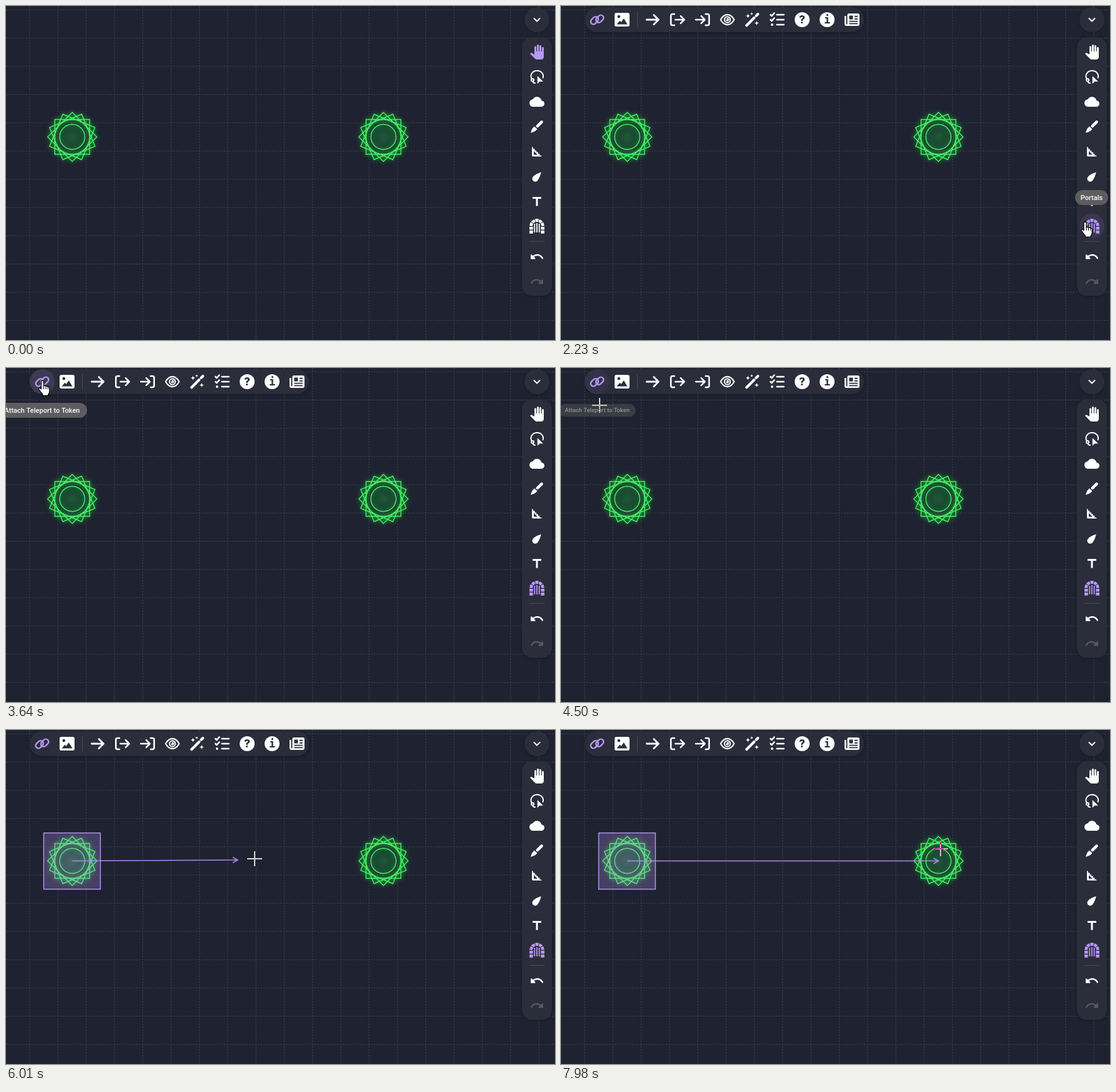
These frames come from a looping animation (881x537 px, 8000 ms). An HTML page with a canvas:

```html
<!DOCTYPE html>
<html>
<head>
<meta charset="utf-8">
<style>
html, body { margin: 0; height: 100%; overflow: hidden; background: #1f2230; }
canvas { display: block; }
</style>
</head>
<body>
<canvas id="stage" width="881" height="537"></canvas>
<script>
const c = document.getElementById('stage').getContext('2d');
const LOOP = 8000, STEP = 70, CELL = 45.4;
const BAR = '#2b2d3b', PURPLE = '#b898f7', WHITE = '#fff';
const LEFT = { x: 106.3, y: 210.5 }, RIGHT = { x: 605.7, y: 210.5 };

// Pointer path: time, x, y
const track = [
  [560, 790, 560], [840, 830, 440], [1120, 843, 362], [1400, 841, 347],
  [2170, 841, 347], [2240, 790, 320], [2520, 430, 190], [2800, 130, 75], [3010, 45, 48],
  [3290, 54, 28], [3430, 58.5, 20], [4340, 58.5, 20], [4480, 62, 60], [4760, 95, 190],
  [4900, 104, 222], [5040, 106, 207], [5390, 106, 207], [5600, 165, 206],
  [5950, 399, 207], [6090, 470, 207], [6300, 548, 206], [6640, 594, 205],
  [7000, 594, 205], [7140, 604, 204], [7740, 604, 204], [7980, 609, 191]
];

// Icons live in a 24 px box: fill path, stroke path, stroke width
const undoPath = 'M12.5 8c-2.65 0-5.05.99-6.9 2.6L3.71 8.71C3.08 8.08 2 8.52 2 9.41V15c0 .55.45 1 1 1h5.59c.89 0 1.34-1.08.71-1.71l-1.91-1.91c1.39-1.16 3.16-1.88 5.12-1.88 3.16 0 5.89 1.84 7.19 4.5.27.56.91.84 1.5.64.71-.23 1.07-1.04.75-1.72C20.23 10.42 16.65 8 12.5 8z';
const icons = {
  hand: ['M23 5.5V20c0 2.2-1.8 4-4 4h-7.3c-1.08 0-2.1-.43-2.85-1.19L1 14.83s1.26-1.23 1.3-1.25c.22-.19.49-.29.79-.29.22 0 .42.06.6.16.04.01 4.31 2.46 4.31 2.46V4c0-.83.67-1.5 1.5-1.5S11 3.17 11 4v7h1V1.5c0-.83.67-1.5 1.5-1.5S15 .67 15 1.5V11h1V2.5c0-.83.67-1.5 1.5-1.5s1.5.67 1.5 1.5V11h1V5.5c0-.83.67-1.5 1.5-1.5s1.5.67 1.5 1.5z'],
  lasso: ['M12.8 10.5V23l3.6-3.6H22z', 'M3.4 14.5A9.8 8.8 0 1 1 21.6 13.5M3 17a2 2 0 1 0 4 0a2 2 0 1 0-4 0M5.5 19q.5 3 3.5 3', 2],
  cloud: ['M19.35 10.04C18.67 6.59 15.64 4 12 4 9.11 4 6.6 5.64 5.35 8.04 2.34 8.36 0 10.91 0 14c0 3.31 2.69 6 6 6h13c2.76 0 5-2.24 5-5 0-2.64-2.05-4.78-4.65-4.96z'],
  brush: ['M8 11.5L12.5 16 9.5 19Q7 20.5 2 22 3.2 17 5 14.5z', 'M19.6 4.4L12.8 11.2', 4.6],
  square: ['M17.66 17.66l-1.06 1.06-.71-.71 1.06-1.06-1.94-1.94-1.06 1.06-.71-.71 1.06-1.06-1.94-1.94-1.06 1.06-.71-.71 1.06-1.06L9.7 9.7l-1.06 1.06-.71-.71 1.06-1.06-1.94-1.94-1.06 1.06-.71-.71 1.06-1.06L4 4v14c0 1.1.9 2 2 2h14l-2.34-2.34zM7 17v-5.76L12.76 17H7z'],
  drop: ['M18.8 5.2C16 6 8.5 9 6 12.2a4.8 4.8 0 1 0 7.6 5.6C16 14.5 18 9 18.8 5.2z'],
  text: ['M5 5h14v3h-5.5v11.5h-3V8H5z'],
  undo: [undoPath],
  chevron: ['', 'M7.5 10l4.5 4.5 4.5-4.5', 2.1],
  image: ['M3 1h18q3 0 3 3v16q0 3-3 3H3q-3 0-3-3V4q0-3 3-3zM4.5 7a2.3 2.3 0 1 0 4.6 0a2.3 2.3 0 1 0-4.6 0M3.5 19.5h17L14.8 10 10.5 16 8.5 13.5z'],
  arrow: ['', 'M2.5 12H21.5M14 4.5l7.5 7.5-7.5 7.5', 2.9],
  leave: ['', 'M7 3H4Q1.3 3 1.3 5.7V18.3Q1.3 21 4 21H7M8.5 12H22.5M17 6.2l5.8 5.8-5.8 5.8', 2.6],
  enter: ['', 'M17 3h3q2.7 0 2.7 2.7V18.3Q22.7 21 20 21h-3M1.3 12H15.5M10 6.2l5.8 5.8-5.8 5.8', 2.6],
  eye: ['M11 9.7a2.5 2.5 0 1 1-1.4 2.6q2 .3 1.4-2.6z', 'M1.2 12Q5.5 3.9 12 3.9T22.8 12Q18.5 20.1 12 20.1T1.2 12zM7.3 12a4.7 4.7 0 1 0 9.4 0a4.7 4.7 0 1 0-9.4 0', 2.1],
  wand: ['M5 2.5l1 2.5 2.5 1L6 7 5 9.5 4 7 1.5 6 4 5zM11 0l.7 1.8 1.8.7-1.8.7L11 5l-.7-1.8-1.8-.7 1.8-.7zM19 14l1 2.5 2.5 1-2.5 1-1 2.5-1-2.5-2.5-1 2.5-1z', 'M2.8 21.2L15 9M18.2 5.8L21 3', 4.2],
  list: ['M1.7 20a2 2 0 1 0 4 0a2 2 0 1 0-4 0', 'M1.2 4l2 2 4-4.5M1.2 12l2 2 4-4.5M11.5 4H22.5M11.5 12H22.5M11.5 20H22.5', 2.6],
  news: ['M7 2h14q3 0 3 3v14q0 3-3 3H3q-3 0-3-3V6h2.6v12.5q0 1 .9 1T4.5 18.500V4.500Q4.500 2 7 2zM7.500 5.500v6h6v-6zM16 5.800v1.900h5V5.800zM16 9.800v1.900h5V9.800zM7.500 13.800v1.800h13.500v-1.800zM7.500 17.500v1.800h13.500v-1.800z']
};
for (const icon of Object.values(icons)) {
  icon[0] = new Path2D(icon[0]);
  icon[1] = icon[1] && new Path2D(icon[1]);
}
const handCursor = new Path2D('M-2 2a2 2 0 0 1 4 0v7q2-1.500 3.500.5 2-1 3.300.8 2.500-.5 2.500 2v5q0 3-2 5v2h-9v-2q-3-3-6-8-1-2.500 1.500-2.500l2.200 2z');

const clamp = v => Math.max(0, Math.min(1, v));
const ramp = (t, a, b) => clamp((t - a) / (b - a));

function pointerAt(t) {
  const i = track.findIndex(k => k[0] > t);
  if (i === 0) return { x: track[0][1], y: track[0][2] };
  const a = track[i < 0 ? track.length - 1 : i - 1], b = i < 0 ? a : track[i];
  const u = i < 0 ? 0 : ramp(t, a[0], b[0]);
  return { x: a[1] + (b[1] - a[1]) * u, y: a[2] + (b[2] - a[2]) * u };
}

function disc(x, y, r, color) {
  c.fillStyle = color;
  c.beginPath();
  c.arc(x, y, r, 0, 7);
  c.fill();
}

function pill(x, y, w, h, r, color) {
  c.fillStyle = color;
  c.beginPath();
  c.roundRect(x, y, w, h, r);
  c.fill();
}

function line(color, width, ...points) {
  c.strokeStyle = color;
  c.lineWidth = width;
  c.beginPath();
  points.forEach(p => c.lineTo(p[0], p[1]));
  c.stroke();
}

function icon(name, x, y, color = WHITE, flip = 1) {
  const [fill, stroke, width] = icons[name];
  c.save();
  c.translate(x, y);
  c.scale(flip, 1);
  c.translate(-12, -12);
  c.fillStyle = c.strokeStyle = color;
  c.fill(fill, 'evenodd');
  if (stroke) {
    c.lineWidth = width;
    c.lineCap = c.lineJoin = 'round';
    c.stroke(stroke);
  }
  c.restore();
}

function gate(x, y, color) {
  c.save();
  c.translate(x, y);
  c.strokeStyle = c.fillStyle = color;
  c.lineWidth = 4.8;
  for (let i = 0; i < 5; i++) {
    c.beginPath();
    c.arc(0, 0, 9.5, Math.PI * (1 + i / 5) + .05, Math.PI * (1.2 + i / 5) - .05);
    c.stroke();
  }
  for (const side of [-12, 6.4]) {
    c.fillRect(side, 1, 5.6, 4.6);
    c.fillRect(side, 7, 5.6, 4.8);
  }
  for (const bar of [-3.7, 0, 3.7]) c.fillRect(bar - .9, bar ? -4 : -5, 1.8, bar ? 14 : 15);
  c.restore();
}

function chain(x, y) {
  c.strokeStyle = PURPLE;
  c.lineWidth = 2.4;
  for (const s of [-1, 1]) {
    c.save();
    c.translate(x + s * 4.2, y - s * 1.3);
    c.rotate(-Math.PI / 4);
    c.beginPath();
    c.roundRect(-6.8, -4.4, 13.6, 8.8, 4.4);
    c.stroke();
    c.restore();
  }
}

function badge(x, sign, font) {
  disc(x, 22, 12, WHITE);
  c.fillStyle = BAR;
  c.font = font;
  c.textAlign = 'center';
  c.fillText(sign, x, 28.2);
}

function grid() {
  c.save();
  c.setLineDash([2.27, 2.27]);
  for (let x = 38; x < 881; x += CELL) line('#434651', 1, [x, 0], [x, 537]);
  for (let y = 6.2; y < 537; y += CELL) line('#434651', 1, [0, y], [881, y]);
  c.restore();
}

function portal({ x, y }) {
  c.save();
  c.translate(x, y);
  const glow = c.createRadialGradient(0, 0, 2, 0, 0, 21);
  glow.addColorStop(0, '#1d5635');
  glow.addColorStop(1, '#1b3c33');
  disc(0, 0, 20.5, glow);
  c.strokeStyle = '#4cf06a';
  c.shadowColor = '#12d637';
  c.shadowBlur = 7;
  c.lineWidth = 1.4;
  c.beginPath();
  for (let i = 0; i < 4; i++) {
    for (let k = 0; k < 4; k++) {
      const a = Math.PI * (i / 8 + k / 2);
      c[k ? 'lineTo' : 'moveTo'](39.5 * Math.cos(a), 39.5 * Math.sin(a));
    }
    c.closePath();
  }
  for (const r of [20.2, 28]) {
    c.moveTo(r, 0);
    c.arc(0, 0, r, 0, 7);
  }
  c.stroke();
  c.restore();
}

function tooltip(text, x, y, width, alpha) {
  if (!alpha) return;
  c.save();
  c.globalAlpha = alpha;
  c.translate(x, y);
  c.scale(.75 + .25 * alpha, .75 + .25 * alpha);
  pill(-width / 2, -12, width, 24, 12, '#5d5d60');
  c.fillStyle = WHITE;
  c.font = '500 11px Roboto, sans-serif';
  c.textAlign = 'center';
  c.fillText(text, 0, 3.5);
  c.restore();
}

function shadowed(draw) {
  c.save();
  c.shadowColor = 'rgba(0,0,0,.25)';
  c.shadowBlur = 5;
  c.shadowOffsetY = 1;
  draw();
  c.restore();
}

function sidePanel(active, hover) {
  shadowed(() => {
    disc(852, 22, 20, BAR);
    pill(828, 50, 48, 416, 16, BAR);
  });
  icon('chevron', 852, 22);
  icon('hand', 852, 74, active ? WHITE : PURPLE);
  ['lasso', 'cloud', 'brush', 'square', 'drop', 'text'].forEach((n, i) => icon(n, 852, 114 + i * 40));
  if (hover) disc(852, 354, 20, `rgba(184,152,247,${.1 * hover})`);
  gate(852, 354, active ? PURPLE : WHITE);
  line('#4a4c58', 1, [840, 378.5], [864, 378.5]);
  icon('undo', 852, 403);
  icon('undo', 852, 443, '#555763', -1);
}

function topBar(hover, press) {
  shadowed(() => pill(38, 2, 448, 40, 20, BAR));
  if (hover) disc(58, 22, 20, `rgba(184,152,247,${.13 * hover})`);
  if (press) disc(58, 22, 12, 'rgba(184,152,247,.2)');
  chain(58, 22);
  icon('image', 98, 22);
  line('#4a4c58', 1, [122.5, 10], [122.5, 34]);
  ['arrow', 'leave', 'enter', 'eye', 'wand', 'list'].forEach((n, i) => icon(n, 147 + i * 40, 22));
  badge(387, '?', '800 17px Inter, sans-serif');
  badge(427, 'i', 'bold 17px "DejaVu Sans Mono", monospace');
  icon('news', 467, 22);
}

function selection(t, pointer) {
  c.fillStyle = 'rgba(184,152,247,.25)';
  c.fillRect(60.500, 165.500, 91, 90.500);
  c.strokeStyle = PURPLE;
  c.lineWidth = 1.4;
  c.strokeRect(60.500, 165.500, 91, 90.500);
  // The arrow trails the pointer and locks onto the second portal
  const late = pointerAt(t - 48);
  const tip = late.x > 560 ? RIGHT : { x: Math.max(LEFT.x, late.x + 5), y: 209 };
  line('#ac8bec', 1.6, [LEFT.x, LEFT.y], [tip.x, tip.y]);
  line('#ac8bec', 1.6, [tip.x - 8, tip.y - 4.5], [tip.x, tip.y], [tip.x - 8, tip.y + 4.5]);
}

function cursor(t, { x, y }) {
  const overBar = x > 38 && x < 486 && y < 42;
  if (t < 2240 || overBar) {
    c.save();
    c.translate(x, y);
    c.fillStyle = WHITE;
    c.strokeStyle = '#000';
    c.lineWidth = 1.3;
    c.lineJoin = 'round';
    c.fill(handCursor);
    c.stroke(handCursor);
    line('#000', 1, [2, 9], [2, 14]);
    line('#000', 1, [5.500, 10], [5.500, 14]);
    line('#000', 1, [8.800, 11], [8.800, 14]);
    c.restore();
    return;
  }
  c.globalCompositeOperation = 'difference';
  c.fillStyle = WHITE;
  c.fillRect(Math.round(x) - 12, Math.round(y) - 1, 24, 2);
  c.fillRect(Math.round(x) - 1, Math.round(y) - 12, 2, 11);
  c.fillRect(Math.round(x) - 1, Math.round(y) + 1, 2, 11);
  c.globalCompositeOperation = 'source-over';
  if (t >= 5190 && t < 5460) disc(x, y, 12, 'rgba(255,235,0,.5)');
}

function draw(t) {
  const step = Math.floor(t / STEP) * STEP, pointer = pointerAt(step);
  const gateTip = ramp(t, 1200, 1430) * (1 - ramp(t, 2300, 2480));
  const chainTip = ramp(t, 3280, 3500) * (1 - ramp(t, 4400, 4580));
  const active = t >= 1290;

  c.fillStyle = '#1f2230';
  c.fillRect(0, 0, 881, 537);
  grid();
  portal(LEFT);
  portal(RIGHT);
  if (t >= 5460) selection(step, pointer);
  sidePanel(active, gateTip);
  if (active) topBar(chainTip, t >= 3900 && t < 4030);
  tooltip('Portals', 851.5, 308, 53, gateTip);
  tooltip('Attach Teleport to Token', 58, 68, 144, chainTip);
  if (t >= 600) cursor(step, pointer);
}

const start = performance.now();
(function frame() {
  draw((performance.now() - start) % LOOP);
  requestAnimationFrame(frame);
})();
</script>
</body>
</html>
```
